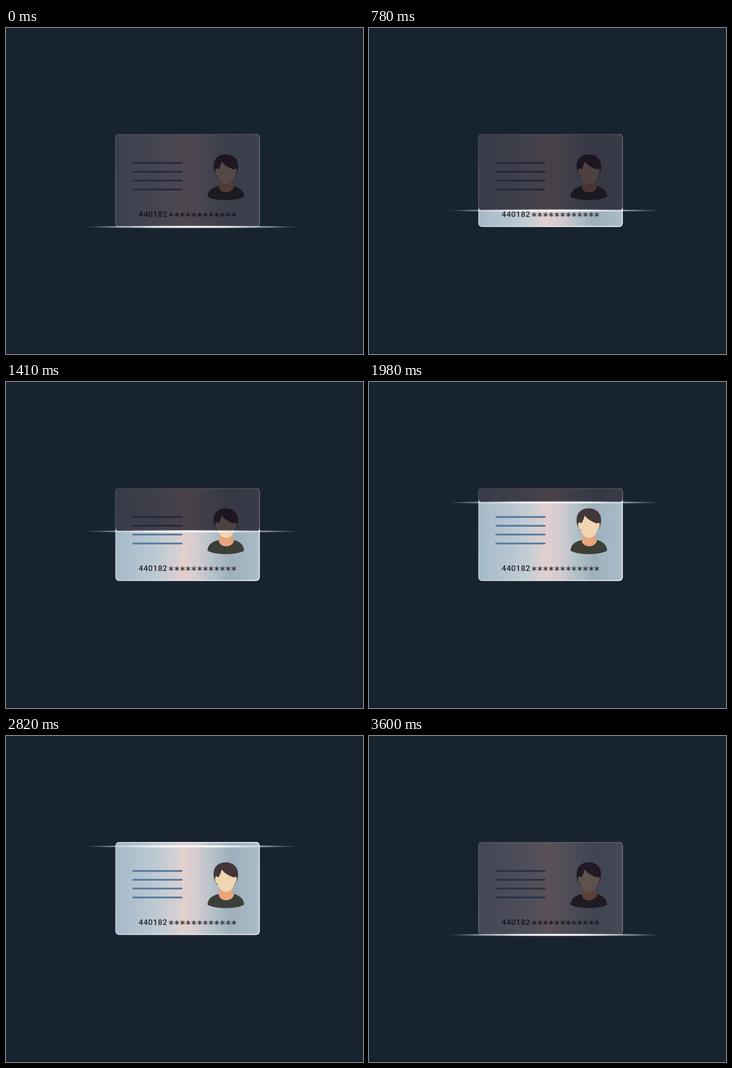
Animation of 700 by 640 pixels, one loop 3.63 s. Source, as an HTML page:

```html
<!DOCTYPE html>
<html lang="en">
<head>
<meta charset="utf-8">
<title>Card scan</title>
<style>
  html, body { margin: 0; width: 100%; height: 100%; overflow: hidden; background: #182330; }
  svg { display: block; width: 700px; height: 640px; }
  .rules { stroke: #587a9e; stroke-width: 3.6; stroke-linecap: round; }
  .digits { font: 500 15.5px Roboto, sans-serif; letter-spacing: .6px; fill: #26262b; }
  .mask { font: 19px "DejaVu Sans Mono", monospace; letter-spacing: -.25px; fill: #26262b;
          stroke: #26262b; stroke-width: .3; }
</style>
</head>
<body>
<svg viewBox="0 0 700 640">
  <defs>
    <linearGradient id="foil">
      <stop offset="0" stop-color="#a5bac8"/>
      <stop offset=".25" stop-color="#b9c8d2"/>
      <stop offset=".38" stop-color="#cdced3"/>
      <stop offset=".47" stop-color="#e3d0cf"/>
      <stop offset=".56" stop-color="#d5cccf"/>
      <stop offset=".66" stop-color="#b8c3cb"/>
      <stop offset=".8" stop-color="#9db0bc"/>
      <stop offset="1" stop-color="#a9bcc7"/>
    </linearGradient>
    <linearGradient id="edge" x1="0" y1="0" x2="1" y2=".3">
      <stop offset="0" stop-color="#fff" stop-opacity=".25"/>
      <stop offset="1" stop-color="#fff" stop-opacity=".85"/>
    </linearGradient>
    <linearGradient id="core">
      <stop offset="0" stop-color="#dfe8f0" stop-opacity="0"/>
      <stop offset=".15" stop-color="#dfe8f0" stop-opacity=".5"/>
      <stop offset=".36" stop-color="#fff" stop-opacity=".9"/>
      <stop offset=".5" stop-color="#fff"/>
      <stop offset=".64" stop-color="#fff" stop-opacity=".9"/>
      <stop offset=".85" stop-color="#dfe8f0" stop-opacity=".5"/>
      <stop offset="1" stop-color="#dfe8f0" stop-opacity="0"/>
    </linearGradient>
    <radialGradient id="halo">
      <stop offset="0" stop-color="#fff" stop-opacity=".6"/>
      <stop offset=".5" stop-color="#e6eef5" stop-opacity=".28"/>
      <stop offset="1" stop-color="#dfe8f0" stop-opacity="0"/>
    </radialGradient>
  </defs>

  <rect width="700" height="640" fill="#182330"/>
  <rect y="637" width="700" height="3" fill="#151f2c"/>

  <rect x="214.5" y="208" width="283" height="182.5" rx="7" fill="url(#foil)"/>
  <rect x="215.3" y="208.8" width="281.4" height="180.9" rx="6.3" fill="none" stroke="url(#edge)" stroke-width="1.7"/>

  <path class="rules" d="M249.5 265H344.5M249.5 282.2H344.5M249.5 299.5H344.5M249.5 317H344.5"/>

  <g id="portrait">
    <path fill="#3b3f38" d="M395 331C396 318 405 313 418 310H446C458 313 466 319 467 331C461 335 447 338 431 338S401 335 395 331Z"/>
    <path fill="#e9a57c" d="M419 300H444V309L447 311C446 318 439 322.5 431.5 322.5S418 318 417 311L419 309Z"/>
    <path fill="#43363a" d="M431 248C446 248 455 258 455 271C455 280 452 288 448 292H414C410 287 407 279 407 271C407 257 416 248 431 248Z"/>
    <path fill="#f0d5b2" d="M423 262C427 268 434 273 447 278C451 274 453.5 278 452 283C451 288 449 290 448 291C445 300 438 306 431.5 306S418 300 415 291C412 289 410 286 410 280C410 275 414 274 416 278C419 274 421 269 423 262Z"/>
  </g>

  <text class="digits" x="260" y="371">440182</text>
  <text class="mask" x="318" y="375.6">************</text>

  <rect id="shade" x="214.5" y="208" width="283" rx="7" fill="#0e0a17"/>

  <g id="beam">
    <ellipse cx="363.5" rx="212" ry="4" fill="url(#halo)"/>
    <ellipse cx="363.5" rx="212" ry="1.6" fill="url(#core)"/>
  </g>
</svg>

<script>
  const LOOP = 3630, TOP = 209.5, BOTTOM = 390.5, CARD_TOP = 208, CARD_HEIGHT = 182.5;
  const RISE = [75, 2625], FALL = [2710, 3577], FADE = [3155, 3655];
  const shade = document.getElementById('shade');
  const beam = document.getElementById('beam');

  const progress = (t, [from, to]) => Math.min(1, Math.max(0, (t - from) / (to - from)));
  const ease = p => (1 - Math.cos(Math.PI * p)) / 2;

  function draw(t) {
    const lift = ease(progress(t, RISE)) - ease(progress(t, FALL));
    const y = BOTTOM + (TOP - BOTTOM) * lift;
    const rising = t < RISE[1];
    const height = rising ? Math.max(0, y - .5 - CARD_TOP) : CARD_HEIGHT;
    const fade = progress(rising ? t + LOOP : t, FADE);

    beam.setAttribute('transform', `translate(0 ${y.toFixed(2)})`);
    shade.setAttribute('height', height.toFixed(2));
    shade.setAttribute('opacity', (.72 * fade).toFixed(3));
  }

  const start = performance.now();
  function tick() {
    draw((performance.now() - start) % LOOP);
    requestAnimationFrame(tick);
  }
  tick();
</script>
</body>
</html>
```
